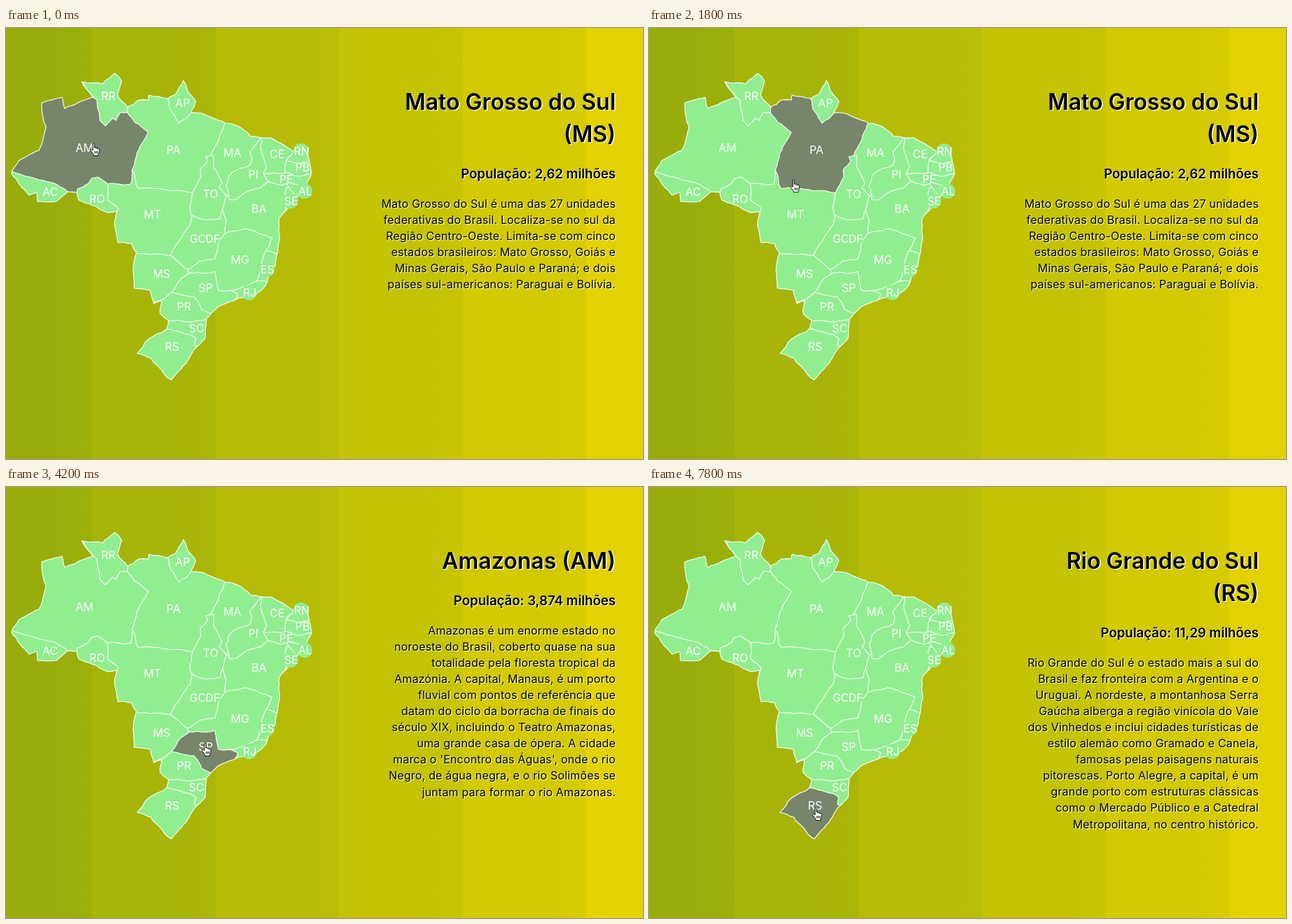
Animation of 909 by 616 pixels, one loop 8 s. Source, as an HTML page with a canvas:

```html
<!DOCTYPE html>
<html lang="pt-BR">
<head>
<meta charset="utf-8">
<title>Mapa do Brasil</title>
<style>
  html, body { margin: 0; width: 100%; height: 100%; overflow: hidden; background: #b1b808; }
  canvas { display: block; }
</style>
</head>
<body>
<canvas id="stage" width="909" height="616"></canvas>
<script>
const W = 909, H = 616, LOOP = 8000, STEP = 100, RIGHT = 870;
const ctx = document.getElementById('stage').getContext('2d');
const FONT = 'Inter, "Open Sans", sans-serif';
const GREEN = '#90ee90', HOVER = '#77856b';

// Key points of the coast and outer frontier; wobble adds the fine detail
const COAST = `108,77 138,80 155,65 165,76 159,95 173,113 189,103 203,103 204,96 231,101
  242,95 253,75 259,90 271,105 264,121 280,122 313,136 328,139 349,155 378,157 411,177
  428,177 436,208 416,241 390,272 388,315 384,340 368,371 355,384 333,386 302,399 286,416
  284,444 273,455 257,479 236,503 231,500 213,480 207,472 187,465 204,444 229,430 232,418
  220,408 222,390 211,394 206,375 183,372 182,338 186,321 179,308 160,307 155,276 158,262
  145,264 122,253 104,246 101,235 88,234 72,248 45,248 44,235 33,239 8,208 18,190 47,175
  57,140 51,115 51,107 80,99 84,115 124,99 117,90`;

// Painted in order inside the coast: each state only needs the borders
// that later ones leave visible, its other corners are loose.
const STATES = [
  ['MT', 209, 266, '0,0 909,0 909,616 0,616'],
  ['AM', 112, 171, '0,60 190,60 210,150 180,203 178,223 145,223 110,250 0,250'],
  ['PA', 239, 174, '173,60 173,121 184,135 203,149 187,178 180,203 188,229 267,235 290,200 313,150 330,100'],
  ['RR', 146, 97, '100,60 117,90 130,103 133,121 134,132 142,140 152,129 157,132 163,121 173,121 173,60'],
  ['AC', 63, 234, '0,204 38,214 73,224 92,237 80,260 0,260'],
  ['RO', 130, 244, '101,240 102,230 118,222 122,215 131,213 145,223 145,246 160,258 150,285 95,265'],
  ['AP', 252, 107, '231,60 231,101 236,119 247,136 264,121 290,118 290,60'],
  ['MS', 222, 351, '170,322 213,323 235,325 262,335 262,395 222,394 170,400'],
  ['GO', 274, 301, '265,262 263,281 247,305 235,325 259,345 330,330 330,250 290,255'],
  ['MG', 334, 331, '312,294 304,304 298,330 276,333 259,345 262,360 330,390 400,380 400,280 330,280'],
  ['BA', 361, 258, '312,240 312,248 309,257 314,275 312,294 340,287 380,300 371,318 383,330 430,330 430,205 360,215'],
  ['MA', 323, 178, '313,120 313,136 297,172 292,182 295,200 310,243 330,235 375,190 372,130'],
  ['TO', 292, 237, '266,236 263,252 264,266 282,274 306,272 312,248 315,240 304,228 308,222 297,200 296,182 285,184 288,190 277,203 278,213'],
  ['PI', 353, 209, '364,130 364,155 348,177 351,186 348,196 327,204 318,212 314,225 318,245 328,245 340,236 364,228 374,219 390,210'],
  ['SE', 407, 247, '400,228 398,236 402,243 398,262 430,262 430,230'],
  ['AL', 427, 233, '400,222 409,234 416,245 445,245 445,215'],
  ['PE', 400, 216, '367,208 398,203 445,200 445,222 420,226 403,221 392,225 374,219'],
  ['CE', 387, 180, '364,140 363,170 372,198 367,208 398,207 402,185 425,170'],
  ['PB', 423, 199, '400,188 398,206 418,212 445,207 445,185'],
  ['RN', 422, 176, '411,160 411,177 400,190 415,193 445,189 445,160'],
  ['ES', 373, 345, '371,318 364,342 357,362 380,372 405,330'],
  ['SP', 285, 371, '262,350 298,348 303,375 333,378 340,395 291,425 240,400 236,378 250,358'],
  ['RJ', 348, 378, '331,380 322,376 357,362 390,360 380,400 327,388'],
  ['PR', 254, 398, '236,378 268,384 279,402 291,408 310,415 290,435 210,430 205,395 224,388'],
  ['SC', 272, 429, '210,414 232,418 258,420 300,414 300,450 270,465 220,440'],
  ['RS', 237, 455, '200,425 229,430 262,438 271,444 269,454 290,460 290,510 170,510'],
  ['DF', 295, 301, '']
];
const BADGES = 'RN AL SE ES RJ DF'.split(' ');

// Pointer glides: start, end, target x, target y
const GLIDES = [
  [0, 0, 120, 164], [100, 100, 142, 183], [400, 1100, 276, 364],
  [1300, 1300, 298, 335], [1400, 1500, 259, 247], [1600, 1900, 182, 206],
  [2200, 2200, 243, 184], [2900, 3200, 120, 176], [3400, 3400, 112, 174],
  [4200, 4200, 279, 366], [6600, 7200, 233, 458]
];

// time, title, population, description
const PANELS = [
  [0, 'Mato Grosso do Sul|(MS)', '2,62',
    'Mato Grosso do Sul é uma das 27 unidades|federativas do Brasil. Localiza-se no sul da|Região Centro-Oeste. Limita-se com cinco|estados brasileiros: Mato Grosso, Goiás e|Minas Gerais, São Paulo e Paraná; e dois|países sul-americanos: Paraguai e Bolívia.'],
  [2300, 'Pará (PA)', '8,074',
    'Pará, um estado no norte do Brasil, é onde|se encontra o Parque Nacional da|Amazônia. Protegendo uma extensa faixa|da exuberante e densa Floresta|Amazônica, o parque é lar de milhares de|espécies da vida selvagem. Boa parte dela|é alagada todos os anos, tornando o|acesso a áreas distantes somente por|barco. Próxima da desembocadura do Rio|Amazonas está Belém, a capital do Pará.|Ela é conhecida pela arquitetura colonial e|pelo mercado Ver-o-Peso às margens do|rio.'],
  [4100, 'Amazonas (AM)', '3,874',
    "Amazonas é um enorme estado no|noroeste do Brasil, coberto quase na sua|totalidade pela floresta tropical da|Amazónia. A capital, Manaus, é um porto|fluvial com pontos de referência que|datam do ciclo da borracha de finais do|século XIX, incluindo o Teatro Amazonas,|uma grande casa de ópera. A cidade|marca o 'Encontro das Águas', onde o rio|Negro, de água negra, e o rio Solimões se|juntam para formar o rio Amazonas."],
  [6000, 'São Paulo (SP)', '44,04',
    'São Paulo é uma das 27 unidades|federativas do Brasil. Está situado na|Região Sudeste e tem por limites os|estados de Minas Gerais a norte e|nordeste, Paraná a sul, Rio de Janeiro a|leste e Mato Grosso do Sul a oeste, além do|Oceano Atlântico a sudeste.'],
  [7800, 'Rio Grande do Sul|(RS)', '11,29',
    'Rio Grande do Sul é o estado mais a sul do|Brasil e faz fronteira com a Argentina e o|Uruguai. A nordeste, a montanhosa Serra|Gaúcha alberga a região vinícola do Vale|dos Vinhedos e inclui cidades turísticas de|estilo alemão como Gramado e Canela,|famosas pelas paisagens naturais|pitorescas. Porto Alegre, a capital, é um|grande porto com estruturas clássicas|como o Mercado Público e a Catedral|Metropolitana, no centro histórico.']
];

const HAND = new Path2D('M4 1.6Q4 .5 5 .5T6.2 1.6V7Q7 6 8.2 6.6V8Q9.2 6.8 10.3 7.5V8.6Q11.2 7.8 12 8.5Q13.2 8.9 13.2 10V13Q12.8 15.5 11.6 17V18.5H5V17Q3 14 1 11.6Q.3 10 1.5 9.6Q3 9.6 4 11Z');

// Even bands from green to yellow, each softening before the next hard edge
function makeBackdrop() {
  const band = 176.6, grad = ctx.createLinearGradient(0, 0, W, 0);
  const tone = i => `rgb(${152 + 14.7 * i}, ${172.5 + 7.4 * i}, ${11 - 2 * i})`;
  const stop = (x, i) => grad.addColorStop(Math.min(1, Math.max(0, x / W)), tone(i));
  for (let i = 0; i < 6; i++) {
    const x = 122 + (i - 1) * band;
    stop(x, i);
    stop(x + band * 0.68, i);
    stop(x + band, i + 0.3);
  }
  return grad;
}

const wobble = (x, y) => {
  const n = Math.sin(x * 12.99 + y * 78.23) * 43758.55;
  return (n - Math.floor(n) - 0.5) * 2;
};

// Midpoint displacement between two points
function roughLine(path, ax, ay, bx, by) {
  const len = Math.hypot(bx - ax, by - ay);
  if (len < 8 || len > 150) return path.lineTo(bx, by);
  const amp = Math.min(len * 0.08, 1.3), sx = ax + bx, sy = ay + by;
  const mx = sx / 2 + amp * wobble(sx, sy), my = sy / 2 + amp * wobble(sy, sx);
  roughLine(path, ax, ay, mx, my);
  roughLine(path, mx, my, bx, by);
}

function outline(text) {
  const path = new Path2D();
  if (!text) return path;
  const pts = text.split(/\s+/).map(p => p.split(',').map(Number));
  path.moveTo(...pts[0]);
  pts.forEach((p, i) => roughLine(path, ...p, ...pts[(i + 1) % pts.length]));
  path.closePath();
  return path;
}

const backdrop = makeBackdrop();
const coast = outline(COAST);
const shapes = STATES.map(([code, x, y, pts]) => ({ code, x, y, path: outline(pts) }));

function pointerAt(t) {
  const i = GLIDES.findLastIndex(g => g[0] <= t);
  const [from, to, x, y] = GLIDES[i];
  const [, , px, py] = GLIDES[Math.max(0, i - 1)];
  const steps = (to - from) / STEP + 1;
  const k = Math.min(1, (Math.floor((t - from) / STEP) + 1) / steps);
  return [px + (x - px) * k, py + (y - py) * k];
}

const stateUnder = (x, y) => shapes.findLast(s => ctx.isPointInPath(s.path, x, y));

function setFont(weight, size, spacing, align) {
  ctx.font = `${weight} ${size}px ${FONT}`;
  ctx.letterSpacing = spacing + 'px';
  ctx.textAlign = align;
}

function setShadow(offset) {
  ctx.shadowColor = offset ? '#fff' : 'transparent';
  ctx.shadowOffsetX = ctx.shadowOffsetY = offset;
  ctx.shadowBlur = offset ? 1 : 0;
}

function drawMap(hover) {
  const fill = s => s === hover ? HOVER : GREEN;
  ctx.strokeStyle = '#fff';
  ctx.lineWidth = 1.1;
  ctx.lineJoin = 'round';
  ctx.save();
  ctx.clip(coast);
  for (const s of shapes) {
    ctx.fillStyle = fill(s);
    ctx.fill(s.path);
    ctx.stroke(s.path);
  }
  ctx.restore();
  ctx.stroke(coast);

  setFont(400, 16, 0, 'center');
  for (const s of shapes) {
    if (BADGES.includes(s.code)) {
      ctx.fillStyle = fill(s);
      ctx.beginPath();
      ctx.arc(s.x - 1, s.y, 11, 0, Math.PI * 2);
      ctx.fill();
    }
    ctx.fillStyle = '#fff';
    ctx.fillText(s.code, s.x, s.y + 5.5);
  }
}

function drawLines(text, y, step) {
  const lines = text.split('|');
  lines.forEach((line, i) => ctx.fillText(line, RIGHT, y + i * step));
  return (lines.length - 1) * step;
}

function drawPanel([, title, people, body]) {
  ctx.fillStyle = '#000';
  setShadow(1.5);
  setFont(600, 32, 0, 'right');
  const drop = drawLines(title, 116.5, 46);
  setShadow(1);
  setFont(600, 18.7, -0.05, 'right');
  drawLines(`População: ${people} milhões`, 169 + drop, 0);
  setFont(400, 16, 0.16, 'right');
  drawLines(body, 210.5 + drop, 23.1);
  setShadow(0);
}

function drawHand(x, y) {
  ctx.save();
  ctx.translate(x, y);
  ctx.fillStyle = '#fff';
  ctx.strokeStyle = '#111';
  ctx.lineWidth = 1;
  ctx.fill(HAND);
  ctx.stroke(HAND);
  ctx.beginPath();
  for (const lx of [6.8, 8.8, 10.8]) {
    ctx.moveTo(lx, 12);
    ctx.lineTo(lx, 15.5);
  }
  ctx.stroke();
  ctx.restore();
}

const start = performance.now();
function frame() {
  const t = (performance.now() - start) % LOOP;
  const [x, y] = pointerAt(t);
  ctx.fillStyle = backdrop;
  ctx.fillRect(0, 0, W, H);
  drawMap(stateUnder(x + 6, y + 1));
  drawPanel(PANELS.findLast(p => p[0] <= t));
  drawHand(x, y);
  requestAnimationFrame(frame);
}
frame();
</script>
</body>
</html>
```
